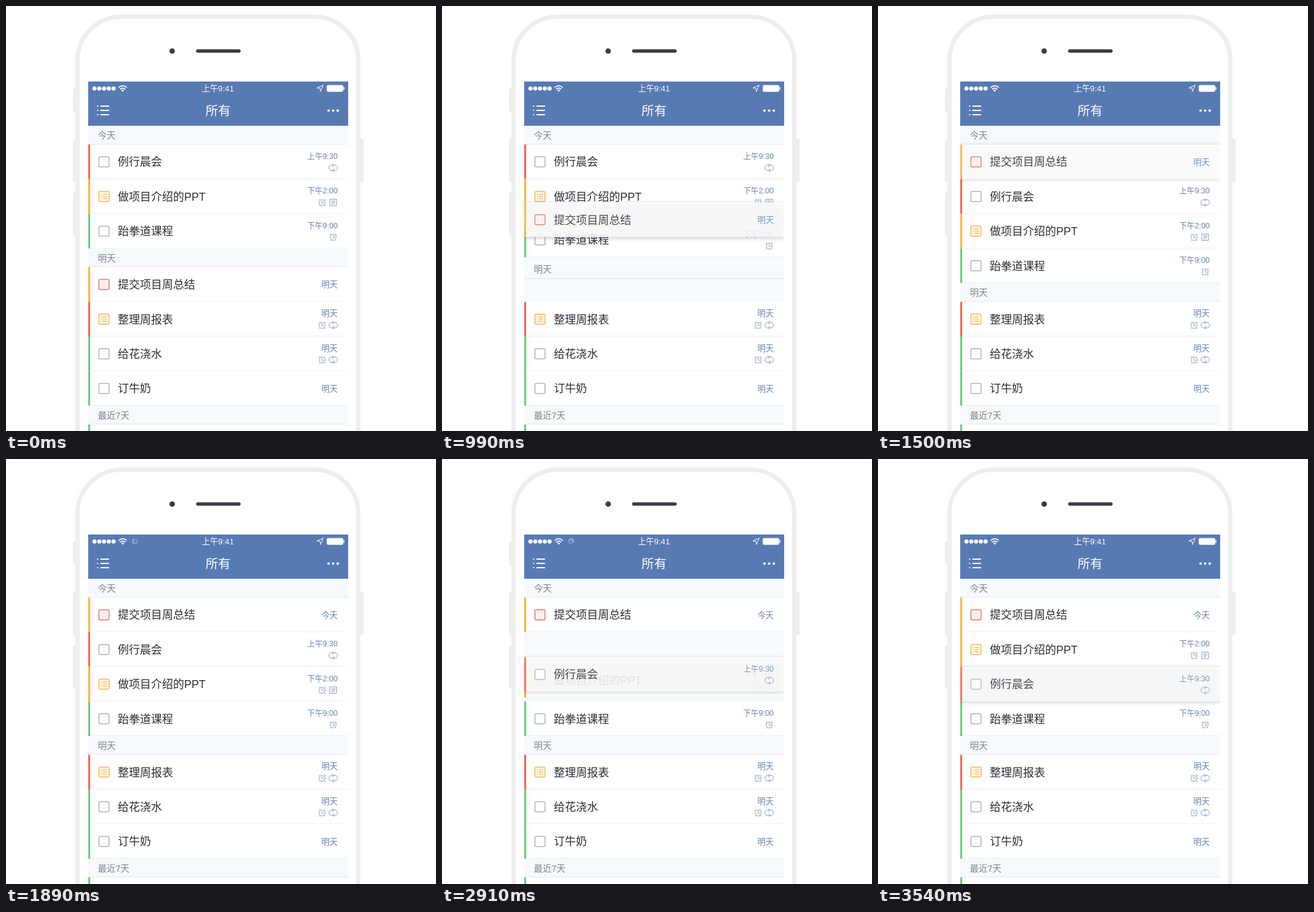
Write an HTML page with a canvas that moves like this. It is 700 px wide and 692 px high and loops after 3.57 s.

```html
<!DOCTYPE html>
<html lang="zh-CN">
<head>
<meta charset="utf-8">
<title>任务列表</title>
<style>
html, body { margin: 0; width: 100%; height: 100%; overflow: hidden; background: #fff; }
canvas { display: block; width: 700px; height: 692px; }
</style>
</head>
<body>
<canvas id="stage"></canvas>
<script>
const LOOP = 3570, STEP = 30, ROW = 56.4, LEFT = 133.5, RIGHT = 557;
const RED = '#f8694f', ORANGE = '#fcb640', GREEN = '#6fcb7d', BLUE = '#587ab3', MUTED = '#6c83ae';
const canvas = document.getElementById('stage');
const ctx = canvas.getContext('2d');
const ratio = window.devicePixelRatio || 1;
canvas.width = 700 * ratio;
canvas.height = 692 * ratio;
ctx.lineCap = ctx.lineJoin = 'round';

const clamp = u => Math.min(1, Math.max(0, u));
const ramp = (t, start, end) => clamp((t - start) / (end - start));
const ease = (t, start, end) => { const u = ramp(t, start, end); return u * u * (3 - 2 * u); };
const shift = (t, start) => ROW * ease(t, start, start + 250);

// Each entry gives its top edge at time t; a lifted row also has lift and shadow amounts.
const rows = [
  { name: '提交项目周总结', bar: ORANGE, box: 'red', icons: '',
    label: t => t < 1530 ? '明天' : '今天',
    top: t => 425.2 - 199.7 * ease(t, 575, 1375),
    lift: t => ramp(t, 380, 530) - ramp(t, 1470, 1620),
    shadow: t => ramp(t, 470, 600) - ramp(t, 1470, 1620) },
  { name: '例行晨会', bar: RED, box: 'plain', icons: 'R', label: () => '上午9:30',
    top: t => 225.5 + shift(t, 1178) + ROW * ease(t, 2630, 3060),
    lift: t => ramp(t, 2430, 2560),
    shadow: t => ramp(t, 2550, 2680) },
  { name: '做项目介绍的PPT', bar: ORANGE, box: 'note', icons: 'NC', label: () => '下午2:00',
    top: t => 281.9 + shift(t, 1012) - shift(t, 2858) },
  { name: '跆拳道课程', bar: GREEN, box: 'plain', icons: 'C', label: () => '下午9:00',
    top: t => 338.3 + shift(t, 908) },
  { name: '整理周报表', bar: RED, box: 'note', icons: 'RC', label: () => '明天', top: () => 481.6 },
  { name: '给花浇水', bar: GREEN, box: 'plain', icons: 'RC', label: () => '明天', top: () => 538 },
  { name: '订牛奶', bar: GREEN, box: 'plain', icons: '', label: () => '明天', top: () => 594.4 },
  { name: '', bar: GREEN, box: '', icons: '', label: () => '', top: () => 681.3 }
];
const headers = [
  { name: '今天', top: () => 195 },
  { name: '明天', top: t => 394.7 + shift(t, 893) },
  { name: '最近7天', top: () => 650.8 }
];

function text(str, x, middle, size, color, align = 'left', weight = 400) {
  ctx.font = `${weight} ${size}px "Liberation Sans", "Noto Sans CJK SC", "Noto Sans CJK", sans-serif`;
  ctx.textAlign = align;
  ctx.fillStyle = color;
  ctx.fillText(str, x, middle + size * 0.37);
}
function rect(x, y, w, h, color) {
  ctx.fillStyle = color;
  ctx.fillRect(x, y, w, h);
}
function round(x, y, w, h, r, fill, stroke, width) {
  ctx.beginPath();
  ctx.roundRect(x, y, w, h, r);
  if (fill) { ctx.fillStyle = fill; ctx.fill(); }
  if (stroke) { ctx.strokeStyle = stroke; ctx.lineWidth = width; ctx.stroke(); }
}
function dot(x, y, r, color) {
  ctx.beginPath();
  ctx.arc(x, y, r, 0, 7);
  ctx.fillStyle = color;
  ctx.fill();
}
function path(d, x, y, color, width) {
  ctx.save();
  ctx.translate(x, y);
  ctx.strokeStyle = color;
  ctx.lineWidth = width;
  ctx.stroke(new Path2D(d));
  ctx.restore();
}

const icons = {
  R: 'M-1.5 4.5H-2.5A4.5 4.5 0 0 1 -2.5 -4.5H1M1.5 -4.5H2.5A4.5 4.5 0 0 1 2.5 4.5H-1M-1 -6.2L1 -4.5L-1.5 -1.5M1 6.2L-1 4.5L1.5 1.5',
  C: 'M4.8 .5A4.8 4.8 0 1 1 -4.8 .5A4.8 4.8 0 1 1 4.8 .5M0 -2V1H2.2M-5.6 -3.2L-3.2 -5.4M5.6 -3.2L3.2 -5.4M-3.5 4.3L-4.6 5.7M3.5 4.3L4.6 5.7',
  N: 'M-5.3 -5.3H5.3V5.3H-5.3ZM-2.7 -2.3H2.7M-2.7 0H2.7M-2.7 2.4H1'
};

function checkbox(kind, y) {
  if (!kind) return;
  const [stroke, fill] = {
    plain: ['#aeb1b7', '#fff'], red: ['#dc7b69', '#fbeeec'], note: ['#f3b955', '#fff6e4']
  }[kind];
  round(151.3, y - 8.2, 16.4, 16.4, 2, fill, stroke, 1.5);
  if (kind === 'note')
    path('M-4.5 -3.5H-4M-1.5 -3.5H4.5M-4.5 0H-4M-1.5 0H4.5M-4.5 3.5H-4M-1.5 3.5H4.5', 159.5, y, stroke, 1.3);
}

function drawRow(row, t) {
  const y = row.top(t), mid = y + 28.3;
  const lift = row.lift ? row.lift(t) : 0;
  const shadow = row.shadow ? row.shadow(t) : 0;
  ctx.save();
  ctx.globalAlpha = 1 - 0.14 * lift;
  ctx.save();
  if (shadow > 0) {
    ctx.shadowColor = `rgba(40,50,70,${0.3 * shadow})`;
    ctx.shadowBlur = 6 * ratio;
    ctx.shadowOffsetY = 1.5 * ratio;
  }
  rect(LEFT, y, RIGHT - LEFT, ROW, '#fff');
  ctx.restore();
  rect(LEFT, y + ROW - 1, RIGHT - LEFT, 1, '#eaeef2');
  rect(LEFT, y, 3.5, ROW, row.bar);
  checkbox(row.box, mid);
  text(row.name, 182, mid, 18, '#2b2d36');
  const label = row.label(t);
  text(label, 540, row.icons ? mid - 9.5 : mid, label.length > 2 ? 12.6 : 13.3, MUTED, 'right');
  [...row.icons].forEach((key, i) => path(icons[key], 532.7 - 18 * i, mid + 9.7, '#8799ba', 1));
  ctx.restore();
}

function drawHeader(header, t) {
  const y = header.top(t);
  text(header.name, 149.5, y + 15.5, 14.5, '#7f858f');
  rect(LEFT, y + 29.6, RIGHT - LEFT, 1, '#dce5ed');
}

function drawSpinner(t) {
  const spinning = (t >= 1620 && t < 2280) || (t >= 2700 && t < 3300);
  if (!spinning) return;
  const head = Math.floor(t / 90);
  for (let i = 0; i < 8; i++) {
    const a = i * Math.PI / 4, c = Math.cos(a), s = Math.sin(a);
    const alpha = 1 - 0.1 * ((head - i) % 8);
    path(`M${c * 2.6} ${s * 2.6}L${c * 4.8} ${s * 4.8}`, 210, 134, `rgba(255,255,255,${alpha})`, 1.1);
  }
}

function drawNav(t) {
  rect(LEFT, 123, RIGHT - LEFT, 72, BLUE);
  for (let i = 0; i < 5; i++) dot(144 + 7.8 * i, 134.3, 3.4, '#fff');
  path('M-6.2 -5A8.5 8.5 0 0 1 6.2 -5M-3.7 -2.4A5.2 5.2 0 0 1 3.7 -2.4', 190, 137.5, '#fff', 1.7);
  dot(190, 137.5, 1.7, '#fff');
  drawSpinner(t);
  text('上午9:41', 345, 134.5, 13.2, '#fff', 'center');
  path('M5 -5L-5 -.5L.2 .2L1 5Z', 511, 134, '#fff', 1);
  round(522.3, 129, 26.5, 10.4, 2.2, '#fff', '#dfe7f3', 0.8);
  round(549.5, 132, 1.5, 4.4, 0.7, '#fff');
  for (const y of [163, 170, 177]) path('M0 0H.4M5.5 0H18', 149, y, '#fff', 1.9);
  text('所有', 345.3, 170.5, 20.5, '#fff', 'center', 300);
  for (let i = 0; i < 3; i++) dot(525 + 7.5 * i, 170.3, 2, '#fff');
}

function drawPhone() {
  for (const [x, y, h] of [[109, 134, 39], [109, 216, 71], [109, 303, 71], [574, 216, 71]])
    round(x, y, 8, h, 3, '#eee');
  round(116.5, 17.5, 457, 800, 71, '#fff', '#eee', 7);
  dot(270.5, 73.4, 4.4, '#3c3b46');
  round(309.5, 70.5, 72.5, 5.5, 2.7, '#3c3b46');
}

function draw(t) {
  ctx.setTransform(ratio, 0, 0, ratio, 0, 0);
  rect(0, 0, 700, 692, '#fff');
  drawPhone();
  ctx.save();
  ctx.beginPath();
  ctx.rect(LEFT, 123, RIGHT - LEFT, 569);
  ctx.clip();
  rect(LEFT, 123, RIGHT - LEFT, 569, '#f6f9fe');
  headers.forEach(header => drawHeader(header, t));
  const lifted = row => row.lift && row.lift(t) > 0;
  rows.filter(row => !lifted(row)).forEach(row => drawRow(row, t));
  rows.filter(lifted).forEach(row => drawRow(row, t));
  drawNav(t);
  ctx.restore();
}

const start = performance.now();
function tick() {
  const t = Math.max(0, performance.now() - start) % LOOP;
  draw(Math.floor(t / STEP) * STEP);
  requestAnimationFrame(tick);
}
tick();
</script>
</body>
</html>
```
